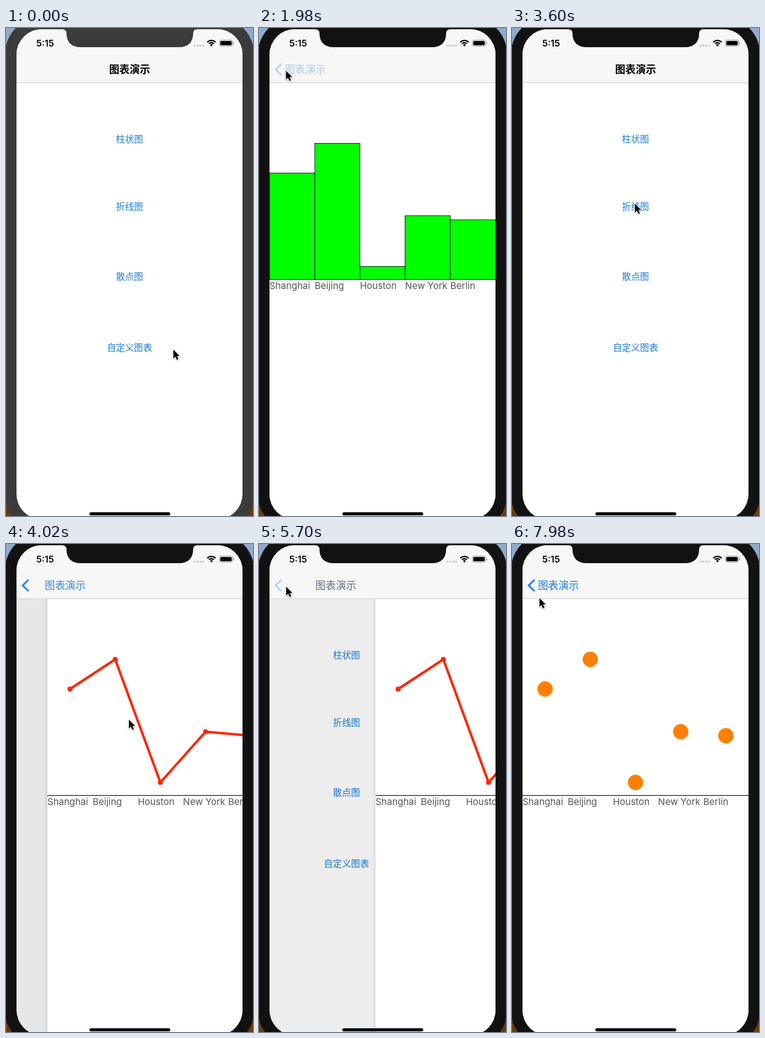
An HTML page with a canvas that plays this animation: 400 by 789 pixels, repeating every 8000 ms.

```html
<!DOCTYPE html>
<html lang="zh">
<head>
<meta charset="utf-8">
<style>
  html, body { margin: 0; width: 100%; height: 100%; overflow: hidden; background: #111; }
  canvas { display: block; width: 400px; height: 789px; }
</style>
</head>
<body>
<canvas id="stage"></canvas>
<script>
const LOOP = 8000, W = 400, H = 789;
const LEFT = 17, TOP = 2, WIDTH = 366, NAV_BOTTOM = 88, AXIS = 406.5, COLUMN = WIDTH / 5;
const BLUE = '#1a7de4';
const CJK = '"Noto Sans CJK SC", "Noto Sans CJK", sans-serif';
const LATIN = 'Inter, Roboto, sans-serif';

const cities = ['Shanghai', 'Beijing', 'Houston', 'New York', 'Berlin'];
const tops = [234.5, 186.5, 385.5, 303.5, 310];
const buttons = [['柱状图', 180], ['折线图', 288.5], ['散点图', 402], ['自定义图表', 516.5]];

// Each navigation: start time, direction, chart index
const moves = [
  { start: 685, push: true, page: 0 },
  { start: 1998, push: false, page: 0 },
  { start: 3771.5, push: true, page: 1 },
  { start: 5588, push: false, page: 1 },
  { start: 6933.5, push: true, page: 2 }
];

// Pointer path: time, x, y
const pointer = [
  [0, 271, 520], [580, 202, 180], [1250, 202, 180], [1850, 43, 69], [2060, 44, 69],
  [2520, 156, 182], [3400, 199, 284], [4500, 199, 284], [5300, 43, 69], [5720, 44, 69],
  [6700, 197, 400], [7440, 197, 400], [8000, 44, 86.5]
];

const canvas = document.getElementById('stage');
const c = canvas.getContext('2d');
const ratio = window.devicePixelRatio || 1;
canvas.width = W * ratio;
canvas.height = H * ratio;

const clamp = v => Math.max(0, Math.min(1, v));

// Critically damped spring: share of the travel still to go
function remaining(ms) {
  const x = 0.014 * ms;
  const r = (1 + x) * Math.exp(-x);
  return r < 0.001 ? 0 : r;
}

function text(str, x, y, font, color, align = 'left', alpha = 1) {
  if (alpha <= 0) return;
  c.save();
  c.globalAlpha *= alpha;
  c.font = font;
  c.fillStyle = color;
  c.textAlign = align;
  c.fillText(str, x, y);
  c.restore();
}

function roundRect(x, y, w, h, r, color) {
  c.beginPath();
  c.roundRect(x, y, w, h, r);
  c.fillStyle = color;
  c.fill();
}

function dot(x, y, r, color) {
  c.beginPath();
  c.arc(x, y, r, 0, Math.PI * 2);
  c.fillStyle = color;
  c.fill();
}

function stroke(points, width, color) {
  c.beginPath();
  points.forEach(([x, y]) => c.lineTo(x, y));
  c.lineWidth = width;
  c.strokeStyle = color;
  c.stroke();
}

function buttonAlpha(index, t) {
  const move = moves.find(m => m.push && m.page === index);
  if (!move || t < move.start - 100) return 1;
  return 0.2 + 0.8 * clamp((t - move.start) / 300);
}

function drawHome(p, t) {
  const shift = -0.3 * WIDTH * (1 - p);
  buttons.forEach(([label, y], i) =>
    text(label, 200 + shift, y + 5.4, '400 14.65px ' + CJK, BLUE, 'center', buttonAlpha(i, t)));
  c.fillStyle = `rgba(0,0,0,${0.1 * (1 - Math.pow(p, 1.6))})`;
  c.fillRect(LEFT, NAV_BOTTOM, WIDTH, H);
}

const charts = [
  () => tops.forEach((y, i) => {
    c.fillStyle = '#00ff00';
    c.fillRect(i * COLUMN, y, COLUMN, AXIS - y);
    c.lineWidth = 0.8;
    c.strokeStyle = '#000';
    c.strokeRect(i * COLUMN, y, COLUMN, AXIS - y);
  }),
  () => {
    const points = tops.map((y, i) => [(i + 0.5) * COLUMN, y]);
    stroke(points, 4, '#ff2600');
    points.forEach(([x, y]) => dot(x, y, 4.1, '#ff2600'));
  },
  () => tops.forEach((y, i) => dot((i + 0.5) * COLUMN, y, 12.4, '#ff8000'))
];

function drawPage(page, p) {
  const x = LEFT + WIDTH * p;
  if (p > 0) {
    const shade = c.createLinearGradient(x - 6, 0, x, 0);
    shade.addColorStop(0, 'rgba(0,0,0,0)');
    shade.addColorStop(1, `rgba(0,0,0,${0.11 * (1 - p)})`);
    c.fillStyle = shade;
    c.fillRect(x - 6, NAV_BOTTOM, 6, H);
  }
  c.save();
  c.translate(x, 0);
  c.beginPath();
  c.rect(0, NAV_BOTTOM, WIDTH, H);
  c.clip();
  c.fillStyle = '#fff';
  c.fillRect(0, NAV_BOTTOM, WIDTH, H);
  stroke([[0, AXIS], [WIDTH, AXIS]], 1, '#000');
  charts[page]();
  cities.forEach((city, i) => text(city, i * COLUMN, 421.5, '400 15px ' + LATIN, '#555'));
  c.restore();
}

function drawStatus() {
  text('5:15', 49, 30, '600 14.6px ' + LATIN, '#000');
  for (let i = 0; i < 4; i++) dot(305.6 + i * 4.5, 28.4, 1.6, '#c8c8c8');
  c.strokeStyle = '#000';
  c.lineWidth = 2.2;
  [10, 6.3].forEach(r => {
    c.beginPath();
    c.arc(332.7, 29.5, r - 0.6, -Math.PI * 0.75, -Math.PI * 0.25);
    c.stroke();
  });
  c.beginPath();
  c.moveTo(332.7, 30);
  c.arc(332.7, 29.5, 3.2, -Math.PI * 0.75, -Math.PI * 0.25);
  c.fillStyle = '#000';
  c.fill();
  c.beginPath();
  c.roundRect(345.5, 19.5, 21.5, 10, 2.8);
  c.lineWidth = 1;
  c.strokeStyle = '#999';
  c.stroke();
  roundRect(347, 21, 18.5, 7, 1.5, '#000');
  roundRect(368, 22.8, 1.3, 3.6, 1, '#999');
}

function drawNav(p, push, pressed) {
  c.fillStyle = '#f7f7f6';
  c.fillRect(LEFT, 0, WIDTH, NAV_BOTTOM);
  c.fillStyle = '#d2d2d2';
  c.fillRect(LEFT, NAV_BOTTOM, WIDTH, 1);
  drawStatus();

  const q = Math.pow(p, push ? 0.9 : 1.23);
  const x = 42 + 125 * q;
  const titleAlpha = clamp((q - 0.1) / 0.56);
  const backAlpha = 1 - clamp((q - 0.1) / 0.35);
  const titleWeight = q > 0.8 ? 600 : 400;
  text('图表演示', x, 72.7, titleWeight + ' 16.6px ' + CJK, '#000', 'left', titleAlpha);
  text('图表演示', x, 72.7, '400 16.6px ' + CJK, BLUE, 'left', backAlpha * (pressed ? 0.35 : 1));

  c.save();
  c.globalAlpha = pressed ? 0.3 : push ? 1 - Math.pow(q, 1.6) : 0.5 * (1 - q);
  stroke([[36.5, 57.8], [27, 67], [36.5, 76.2]], 2.9, '#1d80ee');
  c.restore();
}

function drawBezel(color) {
  const sky = c.createLinearGradient(0, 0, 0, H);
  sky.addColorStop(0, '#8fabcb');
  sky.addColorStop(0.5, '#8fabcb');
  sky.addColorStop(0.5, '#6b3c0a');
  sky.addColorStop(1, '#6b3c0a');
  c.fillStyle = sky;
  c.fillRect(0, 0, W, H);
  roundRect(-1.5, -16.5, 403, 829.5, 58, color);
}

function drawNotch(color) {
  c.fillStyle = color;
  c.fill(new Path2D('M91 0V2Q98 2 98 9C98 23 106 31 121 31H280C295 31 303 23 303 9Q303 2 310 2V0Z'));
}

function drawPointer(t) {
  let i = 1;
  while (i < pointer.length - 1 && t > pointer[i][0]) i++;
  const [t0, x0, y0] = pointer[i - 1], [t1, x1, y1] = pointer[i];
  const k = clamp((t - t0) / (t1 - t0));
  const e = k * k * (3 - 2 * k);
  c.save();
  c.translate(x0 + (x1 - x0) * e, y0 + (y1 - y0) * e);
  const arrow = new Path2D('M0 0V14.2L3.2 11.3L5.6 16.6L8.2 15.5L5.8 10.3H10.2Z');
  c.shadowColor = 'rgba(0,0,0,0.35)';
  c.shadowBlur = 3 * ratio;
  c.shadowOffsetY = ratio;
  c.lineJoin = 'round';
  c.lineWidth = 1.6;
  c.strokeStyle = '#fff';
  c.stroke(arrow);
  c.shadowColor = 'transparent';
  c.fillStyle = '#000';
  c.fill(arrow);
  c.restore();
}

function draw(t) {
  const move = moves.filter(m => m.start <= t).pop() || { start: -LOOP, push: false, page: 0 };
  const rest = remaining(t - move.start);
  const p = move.push ? rest : 1 - rest;
  const pressed = moves.some(m => !m.push && t >= m.start - 90 && t < m.start);
  const bezel = t < 600 ? '#3b3b3b' : '#121212';

  c.setTransform(ratio, 0, 0, ratio, 0, 0);
  drawBezel(bezel);
  c.save();
  c.beginPath();
  c.roundRect(LEFT, TOP, WIDTH, 792.5, 41);
  c.clip();
  c.fillStyle = '#fff';
  c.fillRect(0, 0, W, H);
  drawHome(p, t);
  if (p < 1) drawPage(move.page, p);
  drawNav(p, move.push, pressed);
  c.restore();
  drawNotch(bezel);
  roundRect(135, 783, 131, 5, 2.5, '#000');
  drawPointer(t);
}

const begin = performance.now();
function tick() {
  draw((performance.now() - begin) % LOOP);
  requestAnimationFrame(tick);
}
tick();
</script>
</body>
</html>
```
